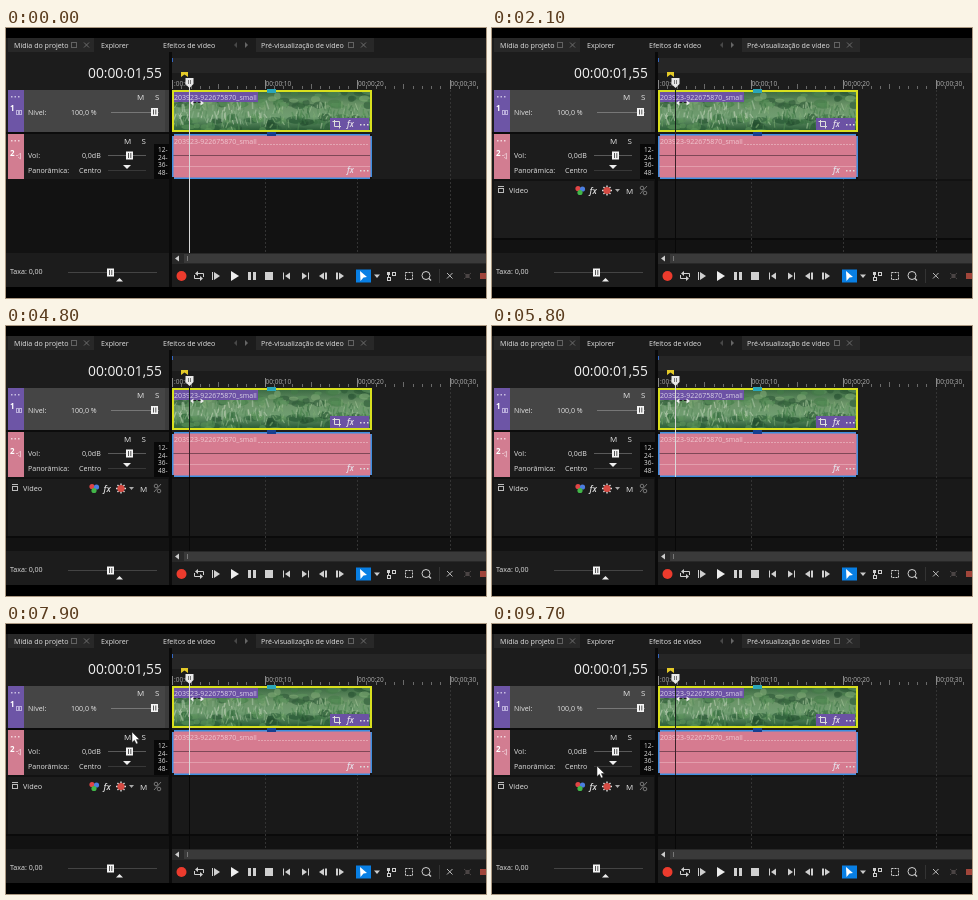
These frames come from a looping animation (480 by 270 pixels, 10 s). An HTML page with a canvas:

```html
<!DOCTYPE html>
<html lang="pt">
<head>
<meta charset="utf-8">
<title>Editor de vídeo</title>
<style>
html, body { margin: 0; width: 100%; height: 100%; overflow: hidden; background: #000; }
canvas { display: block; width: 480px; height: 270px; }
</style>
</head>
<body>
<canvas id="stage" width="480" height="270"></canvas>
<script>
const LOOP = 10000, BUS_AT = 1500, BLINK = 665, PX_10S = 92.5;
const FONT = '"Open Sans", "Noto Sans", sans-serif';
const LIGHT = '#e2e2e2', PANEL = '#1c1c1c';
const ctx = document.getElementById('stage').getContext('2d');
let g = ctx;

function rect(x, y, w, h, c) { g.fillStyle = c; g.fillRect(x, y, w, h); }

function frame(x, y, w, h, c, lw = 1) {
  g.strokeStyle = c;
  g.lineWidth = lw;
  g.strokeRect(x + lw / 2, y + lw / 2, w - lw, h - lw);
}

function text(s, x, y, size = 7.1, c = LIGHT, style = '') {
  g.font = `${style} ${size}px ${FONT}`;
  g.fillStyle = c;
  g.fillText(s, x, y);
}

function path(pts) {
  g.beginPath();
  for (let i = 0; i < pts.length; i += 2) g.lineTo(pts[i], pts[i + 1]);
}

function poly(c, ...pts) { path(pts); g.closePath(); g.fillStyle = c; g.fill(); }

function line(c, lw, ...pts) {
  path(pts);
  g.strokeStyle = c;
  g.lineWidth = lw;
  g.stroke();
}

function dashed(c, dash, ...pts) {
  g.setLineDash(dash);
  line(c, 1, ...pts);
  g.setLineDash([]);
}

function disc(x, y, r, c, ry = r) {
  g.beginPath();
  g.ellipse(x, y, r, ry, 0, 0, 7);
  g.fillStyle = c;
  g.fill();
}

function ring(x, y, r, c, lw = 1) {
  g.beginPath();
  g.arc(x, y, r, 0, 7);
  g.strokeStyle = c;
  g.lineWidth = lw;
  g.stroke();
}

function dots(x, y, c) { for (let i = 0; i < 3; i++) rect(x + i * 3.5, y, 1.5, 1.5, c); }

function handle(x, y) {
  rect(x - 3.5, y - 4, 7, 8, '#f4f4f4');
  rect(x - 1.5, y - 2.5, 1, 5, '#555');
  rect(x + 0.8, y - 2.5, 1, 5, '#555');
}

function tabs() {
  rect(0, 10, 480, 14, PANEL);
  rect(2, 10, 86, 14, '#282828');
  rect(250, 10, 118, 14, '#282828');
  text('Mídia do projeto', 8, 19.5);
  text('Explorer', 95, 19.5);
  text('Efeitos de vídeo', 157, 19.5);
  text('Pré-visualização de vídeo', 255, 19.5);
  for (const x of [65, 342]) {
    frame(x, 14, 6, 6, '#626262');
    line('#6c6c6c', 1, x + 13, 14.5, x + 18, 19.5);
    line('#6c6c6c', 1, x + 18, 14.5, x + 13, 19.5);
  }
  poly('#484848', 231, 14, 231, 20, 228, 17);
  poly('#666', 239, 14, 239, 20, 242, 17);
}

function ruler() {
  rect(166, 30, 314, 15, '#262626');
  rect(166, 45, 314, 17, PANEL);
  rect(166, 30, 1, 4, '#3467c0');
  for (let i = 0; i < 34; i++) {
    const major = i % 10 === 0, h = major ? 9 : i % 5 === 0 ? 5 : 3;
    rect(Math.round(166 + i * PX_10S / 10), 61 - h, 1, h, major ? '#888' : '#6a6a6a');
  }
  text(':00:00', 168, 57.5, 6.5, '#aaa');
  for (let i = 1; i < 4; i++) text('00:00:' + i + '0', 167 + i * PX_10S, 57.5, 6.5, '#b0b0b0');
  poly('#e3c928', 175, 44, 182, 44, 182, 49, 178.5, 46.5, 175, 49);
}

function videoTrack() {
  rect(2, 62, 16, 42, '#6d55a6');
  rect(18, 62, 141, 42, '#454545');
  rect(159, 62, 4, 42, '#3c3c3c');
  dots(5, 68, '#c9bfe2');
  text('1', 4, 83, 8, '#fff', 'bold');
  frame(10, 82, 6, 5, '#b9addb');
  rect(12, 83, 2, 3, '#b9addb');
  text('M', 131, 72, 8);
  text('S', 149, 72, 8);
  text('Nível:', 22, 86.5);
  text('100,0 %', 65, 86.5);
  line('#777', 1, 105, 84.5, 153, 84.5);
  handle(148.5, 84);
}

function audioTrack() {
  rect(2, 106, 16, 45, '#d27d91');
  rect(18, 106, 145, 45, PANEL);
  rect(148, 116, 15, 35, '#080808');
  dots(5, 112, '#f3d5dc');
  text('2', 4, 128, 8, '#fff', 'bold');
  line('#e9bcc7', 1, 10, 127.5, 12, 127.5, 14.5, 125, 14.5, 131, 12, 129);
  text('M', 118, 116, 8);
  text('S', 135.5, 116, 8);
  text('Vol:', 22, 130);
  text('0,0dB', 76, 130);
  text('Panorâmica:', 22, 145);
  text('Centro', 73, 145);
  line('#5a5a5a', 1, 102, 127.5, 140, 127.5);
  handle(123.5, 127.5);
  line('#383838', 1, 102, 142.5, 140, 142.5);
  poly('#eee', 117, 137, 125, 137, 121, 141);
  for (let i = 0; i < 4; i++) text(12 * (i + 1) + '-', 152, 124 + i * 7.6, 6.5, '#ddd');
}

// Soft bushes behind, pale reeds at the left, greener grass at the right
function reeds() {
  let seed = 41;
  const rnd = (a, b) => a + (b - a) * ((seed = seed * 16807 % 2147483647) / 2147483647);
  const pick = a => a[Math.floor(rnd(0, a.length))];
  const shade = g.createLinearGradient(0, 64, 0, 102);
  shade.addColorStop(0, '#3d6c44');
  shade.addColorStop(0.35, '#6b9468');
  shade.addColorStop(0.65, '#6f9d70');
  shade.addColorStop(1, '#2b5c37');
  g.save();
  g.beginPath();
  g.rect(168, 64, 196, 38);
  g.clip();
  rect(168, 64, 196, 38, shade);
  g.globalAlpha = 0.6;
  for (let i = 0; i < 80; i++)
    disc(rnd(166, 366), rnd(63, 79), rnd(3, 8), pick(['#2d5837', '#457c48', '#7fa974', '#5e925e']), rnd(1.5, 4));
  for (let i = 0; i < 60; i++)
    disc(rnd(166, 366), rnd(88, 104), rnd(3, 9), pick(['#234e2e', '#376e40', '#5b945a', '#2c5e39']), rnd(2, 4));
  for (let i = 0; i < 260; i++) {
    const x = rnd(166, 366), y = rnd(80, 103), pale = x < 265 && y < 97;
    const c = pick(pale ? ['#c4d3bb', '#a9c3a5', '#8bb189', '#57895a'] : ['#7fae75', '#4f8952', '#3a7242', '#a2c398']);
    line(c, rnd(0.8, 1.6), x, y, x + rnd(-3, 3), y - rnd(3, 9));
  }
  g.restore();
}

function clipIcons(y, crop) {
  if (crop) {
    line('#ddd', 1, 328.5, y - 4, 328.5, y + 2.5, 335, y + 2.5);
    line('#ddd', 1, 326.5, y - 2.5, 333.5, y - 2.5, 333.5, y + 4.5);
  }
  text('fx', 341, y + 3, 8, '#e4dfe9', 'italic 600');
  dots(354, y, '#ddd');
}

function clips() {
  const name = '203923-922675870_small';
  reeds();
  rect(168, 64, 84, 10, '#6c51a5');
  text(name, 168, 72, 7, '#d8d0e6');
  rect(324, 90, 39, 12, '#6b52a4');
  clipIcons(96, true);
  frame(166, 62, 200, 42, '#d9e01e', 2);
  rect(261, 61, 9, 4, '#2aa5b8');

  rect(166, 106, 200, 45, '#d67b90');
  text(name, 168, 115.5, 7, '#f0c6cf');
  dashed('#e4a6b3', [2, 1], 252, 116.5, 363, 116.5);
  line('#7f4857', 1, 167, 127.5, 364, 127.5);
  line('#e39dac', 1, 167, 138.5, 364, 138.5);
  clipIcons(142, false);
  frame(166, 106, 200, 45, '#3c8fe0', 1.5);
  rect(261, 104, 9, 4, '#163f90');
  for (const x of [166, 364]) for (const y of [106, 149]) rect(x, y, 2, 2, '#111');

  // trim pointer
  poly('#eee', 184, 75, 187.5, 72.5, 187.5, 77.5);
  poly('#eee', 198, 75, 194.5, 72.5, 194.5, 77.5);
  line('#222', 1, 187.5, 74.5, 190, 74.5);
  line('#222', 1, 192, 74.5, 194.5, 74.5);
}

function bus() {
  rect(2, 153, 160, 57, PANEL);
  rect(166, 153, 314, 57, '#191919');
  rect(0, 210, 480, 2, '#0a0a0a');
  line('#bbb', 1, 6, 158.5, 12, 158.5);
  frame(6, 160, 6, 5, '#bbb');
  text('Vídeo', 17, 164.5, 7.3);
  disc(86, 160.5, 2.6, '#e04545');
  disc(90.5, 161, 2.6, '#4b7ee0');
  disc(88, 164.5, 2.6, '#42b649');
  text('fx', 97.5, 165.5, 8.5, '#ddd', 'italic 600');
  for (let i = 0; i < 8; i++) {
    const a = i * Math.PI / 4, c = Math.cos(a), s = Math.sin(a);
    line('#ddd', 1.4, 115 + c * 3, 162.5 + s * 3, 115 + c * 5, 162.5 + s * 5);
  }
  disc(115, 162.5, 3.6, '#d54b43');
  poly('#aaa', 123, 161, 128, 161, 125.5, 164);
  text('M', 134, 166, 8);
  ring(150, 160, 1.8, '#777');
  ring(153, 165, 1.8, '#777');
  line('#777', 1, 148, 166, 155, 158);
}

function bottomLeft() {
  rect(0, 225, 163, 34, PANEL);
  text('Taxa: 0,00', 4, 246);
  line('#444', 1, 62, 244.5, 151, 244.5);
  handle(104.5, 244.5);
  poly('#eee', 113.5, 250, 117, 253.5, 110, 253.5);
}

function transport() {
  const c = '#d0d0d0', y = 248;
  rect(166, 225, 314, 11, '#282828');
  rect(178, 226, 302, 9, '#3a3a3a');
  poly('#ccc', 173, 227.5, 173, 233.5, 169, 230.5);
  rect(181, 228, 1, 5, '#777');
  rect(166, 236, 314, 23, PANEL);
  disc(175.5, y, 5, '#ec3b2d');

  line(c, 1, 190, 245.5, 197.5, 245.5, 197.5, 249);
  line(c, 1, 196, 250.5, 188.5, 250.5, 188.5, 247);
  poly(c, 192, 243, 192, 248, 189, 245.5);
  poly(c, 194, 248, 194, 253, 197, 250.5);

  rect(206, 244, 1, 8, c);
  poly(c, 208, 244, 214, 248, 208, 252);
  poly('#eee', 225, 243, 233, 248, 225, 253);
  rect(242, 244, 3, 8, c);
  rect(247, 244, 3, 8, c);
  rect(259, 244, 8, 8, c);
  rect(277, 244.5, 1, 7, c);
  poly(c, 284, 244.5, 284, 251.5, 279, 248);
  poly(c, 296, 244.5, 296, 251.5, 301, 248);
  rect(302, 244.5, 1, 7, c);
  poly(c, 318, 244.5, 318, 251.5, 313, 248);
  rect(319, 244.5, 2, 7, c);
  rect(330, 244.5, 2, 7, c);
  poly(c, 333, 244.5, 333, 251.5, 338, 248);

  rect(350, 241.5, 15, 13, '#087fe4');
  poly('#fff', 354, 243, 361, 249, 357.5, 249.5, 354.5, 253);
  poly('#ccc', 368, 246.5, 374, 246.5, 371, 250);
  frame(381, 249, 4, 4, c);
  frame(386, 244, 4, 4, c);
  rect(381, 244, 3, 3, c);
  line(c, 1, 382.5, 247, 382.5, 249);
  g.setLineDash([2, 1]);
  frame(399, 244, 8, 8, c);
  g.setLineDash([]);
  ring(420, 247.5, 4, c);
  line(c, 1.2, 423, 250.5, 425, 252.5);
  rect(433, 241, 1, 14, '#333');
  line('#bbb', 1, 441, 245, 446.5, 250.5);
  line('#bbb', 1, 446.5, 245, 441, 250.5);
  dashed('#5a5353', [1, 1], 458, 245, 465, 251);
  dashed('#5a5353', [1, 1], 465, 245, 458, 251);
  rect(459.5, 246, 4, 4, '#4a4444');
  rect(474, 245, 6, 6, '#a0453a');
}

function playhead(on, bottom) {
  if (on) rect(183, 59, 1, bottom - 59, '#d8d8d8');
  else {
    rect(183, 62, 1, 42, '#16221a');
    rect(183, 104, 1, 47, '#3b2028');
  }
  if (!on || bottom < 225) rect(183, 151, 1, 74, '#080808');
  poly('#e8e8e8', 179.5, 50, 187.5, 50, 187.5, 56, 183.5, 60, 179.5, 56);
  rect(182, 52, 1, 4, '#777');
  rect(184, 52, 1, 4, '#777');
}

const moves = [[7300, 150, 96], [7900, 126, 108], [8500, 122, 114], [9700, 105, 142]];

function pointer(t) {
  if (t < moves[0][0]) return;
  let i = 0;
  while (i < moves.length - 2 && t >= moves[i + 1][0]) i++;
  const [t0, x0, y0] = moves[i], [t1, x1, y1] = moves[i + 1];
  const k = Math.min(1, (t - t0) / (t1 - t0));
  g.save();
  g.translate(x0 + (x1 - x0) * k, y0 + (y1 - y0) * k);
  const arrow = [0, 0, 0, 10.5, 2.4, 8.3, 4.2, 12, 6, 11.2, 4.4, 7.6, 7.5, 7.4];
  poly('#fff', ...arrow);
  line('#222', 0.5, ...arrow, 0, 0);
  g.restore();
}

function panel() {
  rect(0, 0, 480, 270, '#000');
  rect(0, 24, 480, 127, PANEL);
  rect(0, 151, 480, 108, '#121212');
  rect(163, 24, 3, 235, '#0a0a0a');
  rect(0, 104, 163, 2, '#0c0c0c');
  tabs();
  text('00:00:01,55', 82, 50, 13.8, '#f2f2f2');
  ruler();
  videoTrack();
  audioTrack();
  bottomLeft();
  transport();
}

function layer(draw) {
  const c = document.createElement('canvas');
  c.width = 480;
  c.height = 270;
  g = c.getContext('2d');
  draw();
  g = ctx;
  return c;
}

const base = layer(panel), media = layer(clips), busRow = layer(bus);

function step(t) {
  return t < 5500 ? Math.min(5100, Math.floor(t / 300) * 300) : Math.floor((t - 100) / 300) * 300 + 100;
}

function draw(now) {
  const t = step(now % LOOP), withBus = t >= BUS_AT;
  ctx.drawImage(base, 0, 0);
  if (withBus) ctx.drawImage(busRow, 0, 0);
  for (let i = 1; i < 4; i++) {
    const x = Math.round(166 + i * PX_10S) + 0.5;
    dashed('#343434', [2, 2], x, 62, x, 225);
  }
  ctx.drawImage(media, 0, 0);
  const phase = t % BLINK / BLINK;
  playhead(phase < 0.15 || phase > 0.65, withBus ? 151 : 225);
  pointer(t);
  requestAnimationFrame(() => draw(performance.now() - start));
}

const start = performance.now();
draw(0);
</script>
</body>
</html>
```
